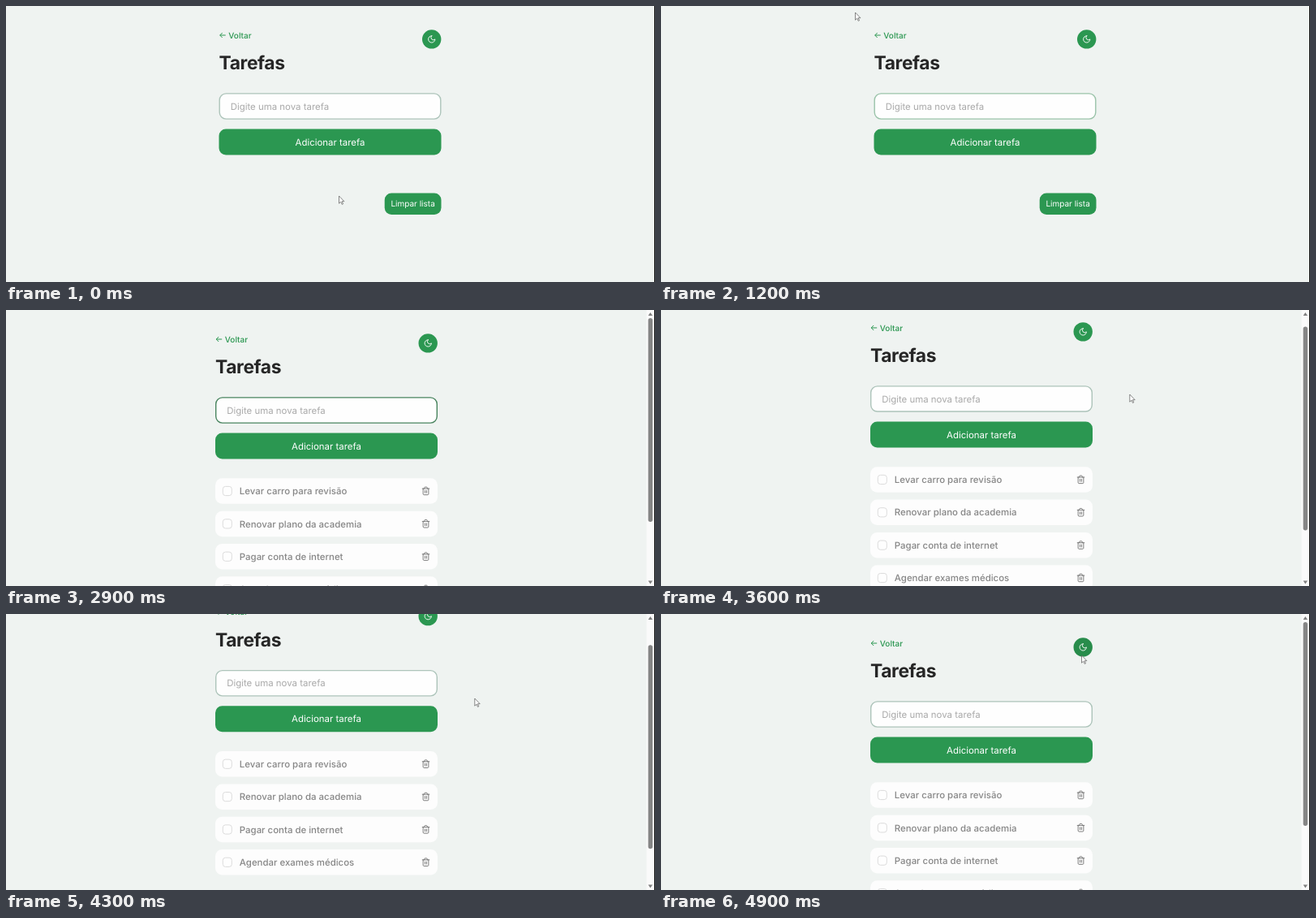
An HTML page for the animation above (5000 ms loop, 800 by 340 pixels).

```html
<!DOCTYPE html>
<html lang="pt-BR">
<head>
<meta charset="utf-8">
<title>Tarefas</title>
<style>
  html, body { margin: 0; width: 100%; height: 100%; overflow: hidden; background: #eff3f1; }
  svg { display: block; width: 800px; height: 340px; }
  text { font-family: Inter, "Liberation Sans", sans-serif; font-size: 11.43px; text-rendering: geometricPrecision; }
  .small { font-size: 10px; }
  .back { font-weight: 500; fill: #2b9751; }
  .title { font-size: 22.86px; font-weight: 700; letter-spacing: -.4px; fill: #262626; }
  .hint { fill: #a9a9a9; }
  .label { fill: #fff; text-anchor: middle; }
  .task { font-weight: 500; fill: #868686; }
  .btn { fill: #2b9751; }
  .btn.hover { fill: #288c4b; }
  .icon { fill: none; stroke-width: 2; stroke-linecap: round; stroke-linejoin: round; }
</style>
</head>
<body>
<svg viewBox="0 0 800 340">
  <rect width="800" height="340" fill="#eff3f1"/>
  <g id="page">
    <path d="M8.2 36H1.2M4.2 33L1.2 36L4.2 39" fill="none" stroke="#2b9751"/>
    <text class="small back" x="11.8" y="39.7">Voltar</text>
    <text class="title" x="0" y="78">Tarefas</text>
    <circle id="theme" class="btn" cx="262.2" cy="40.9" r="11.7"/>
    <path class="icon" stroke="#fff" transform="translate(256.7 35.4) scale(.46)"
      d="M12 3a6 6 0 0 0 9 9 9 9 0 1 1-9-9Z"/>
    <rect id="field" x=".7" y="107.9" width="272.6" height="31.2" rx="8" fill="#fefefe" stroke-width="1.4"/>
    <text class="hint" x="14.2" y="127.7">Digite uma nova tarefa</text>
    <rect id="add" class="btn" width="274" y="151.6" height="32" rx="8.5"/>
    <text class="label" x="137" y="171.6">Adicionar tarefa</text>
    <g id="list"></g>
    <g id="foot">
      <rect id="clear" class="btn" x="204.2" y="230.6" width="69.8" height="26.3" rx="8.5"/>
      <text class="small label" x="239.1" y="247.4">Limpar lista</text>
    </g>
  </g>
  <g id="bar">
    <rect x="789.5" width="10" height="340" fill="#fafafa"/>
    <path d="M791.6 7L794.3 3L797 7ZM791.6 333.5L794.3 337.5L797 333.5Z" fill="#7f7f7f"/>
    <rect id="thumb" x="791.6" width="5.4" height="251" rx="2.7" fill="#858585"/>
  </g>
  <rect x="799" width="1" height="340" fill="#111"/>
  <path id="cursor" d="M0 0V9.2L2.2 7.2L3.7 10.4L5 9.8L3.6 6.7H6.4Z" fill="#fff" stroke="#555" stroke-width=".7"/>
</svg>
<script>
const LOOP = 5000, STEP = 100, LIST_AT = 1500;
const TASKS = ['Levar carro para revisão', 'Renovar plano da academia',
  'Pagar conta de internet', 'Agendar exames médicos'];
const PITCH = 40.35, LIST_SHIFT = 152.9;
const MAX_SCROLL = 93, TRACK = 320, PAGE_HEIGHT = 340 + MAX_SCROLL;

// Stops of the pointer: time, x, y
const STOPS = [
  [0, 410.5, 234], [200, 482, 238], [600, 524, 40], [850, 500, 235], [1200, 239.5, 8],
  [1500, 239.5, 8], [2200, 170, 0], [2600, 425, 158], [2900, 435, 122], [3100, 540, 38],
  [3200, 577.8, 104], [4600, 577.8, 104], [4750, 545, 160], [4900, 518.5, 51]
];

const $ = id => document.getElementById(id);
const place = (id, x, y) => $(id).setAttribute('transform', `translate(${x} ${y})`);

// Eased progress from 0 to 1 between two times
function ease(t, from, to) {
  const p = Math.min(1, Math.max(0, (t - from) / (to - from)));
  return p * p * (3 - 2 * p);
}

function pointerAt(t) {
  const i = STOPS.findLastIndex(stop => stop[0] <= t);
  const a = STOPS[i], b = STOPS[i + 1] || a;
  const p = a === b ? 0 : ease(t, a[0], b[0]);
  return [a[1] + (b[1] - a[1]) * p, a[2] + (b[2] - a[2]) * p];
}

const scrollAt = t => MAX_SCROLL * (ease(t, 3535, 3800) - ease(t, 3900, 4615));

function borderColor(t) {
  if (t >= 2800 && t < 3000) return '#4a8560';
  return t >= 1000 && t < LIST_AT ? '#9ac3a9' : '#adc4ba';
}

$('list').innerHTML = TASKS.map((task, i) => `
  <g transform="translate(0 ${i * PITCH})">
    <rect y="207.3" width="274" height="31.5" rx="8.5" fill="#fdfdfd"/>
    <rect x="9.3" y="217.4" width="11" height="11.2" rx="3.2" fill="#fefefe" stroke="#d8d8d8" stroke-width=".9"/>
    <text class="task" x="29.8" y="227.2">${task}</text>
    <path class="icon" stroke="#777" transform="translate(253.8 217.2) scale(.476)"
      d="M3 6h18M19 6v14c0 1-1 2-2 2H7c-1 0-2-1-2-2V6M8 6V4c0-1 1-2 2-2h4c1 0 2 1 2 2v2M10 11v6M14 11v6"/>
  </g>`).join('');

function draw(t) {
  const listed = t >= LIST_AT;
  const left = listed ? 258 : 262.5;
  const footShift = listed ? LIST_SHIFT : 0;
  const scroll = scrollAt(t);
  const [x, y] = pointerAt(t);
  const px = x - left, py = y + scroll;
  const inside = (l, top, w, h) => px >= l && px <= l + w && py >= top && py <= top + h;
  const hover = (id, on) => $(id).classList.toggle('hover', on);

  place('page', left, -scroll);
  place('foot', 0, footShift);
  place('cursor', x, y);
  $('list').style.display = $('bar').style.display = listed ? '' : 'none';
  $('thumb').setAttribute('y', 10 + scroll * TRACK / PAGE_HEIGHT);
  $('field').setAttribute('stroke', borderColor(t));

  hover('theme', Math.hypot(px - 262.2, py - 40.9) < 11.7);
  hover('add', inside(0, 151.6, 274, 32));
  hover('clear', inside(204.2, 230.6 + footShift, 69.8, 26.3));
  $('cursor').style.display = inside(0, 107, 274, 32.5) ? 'none' : '';
}

function tick() {
  const t = performance.now() % LOOP;
  draw(Math.floor(t / STEP) * STEP);
  requestAnimationFrame(tick);
}
tick();
</script>
</body>
</html>
```
